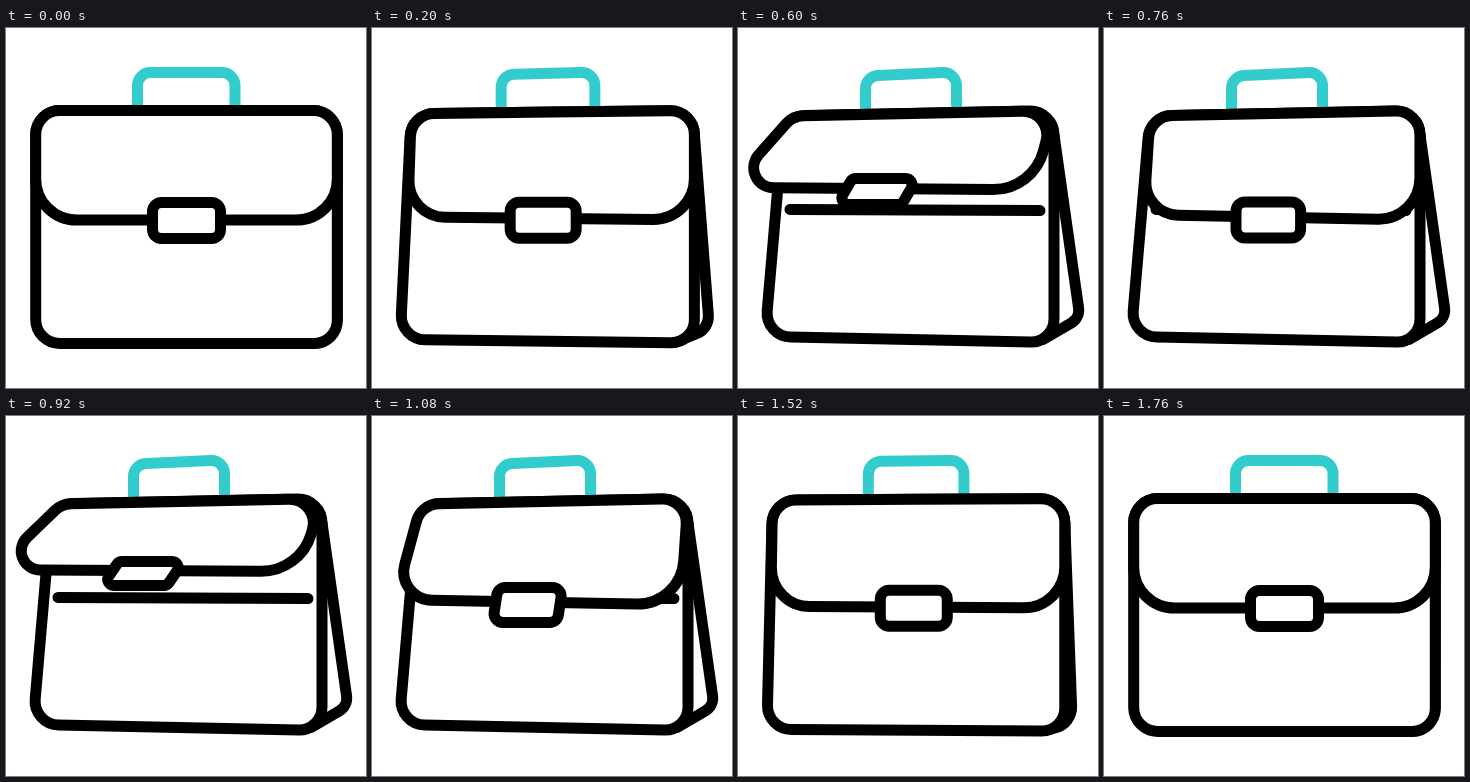
Recreate the animation shown at these times as an HTML page with a canvas. Size 360x360 px, loop 2200 ms.

```html
<!DOCTYPE html>
<html lang="en">
<head>
<meta charset="utf-8">
<title>Briefcase</title>
<style>
html, body { margin: 0; width: 100%; height: 100%; overflow: hidden; background: #fff; }
canvas { display: block; width: 360px; height: 360px; }
</style>
</head>
<body>
<canvas id="stage"></canvas>
<script>
const LOOP = 2200, STEP = 40;
const INK = '#000', TEAL = '#33cccc';
const MAX_LIFT = 51 * Math.PI / 180;

const canvas = document.getElementById('stage');
const ctx = canvas.getContext('2d');
const dpr = window.devicePixelRatio || 1;
canvas.width = canvas.height = 360 * dpr;
ctx.scale(dpr, dpr);

const mix = (a, b, u) => a + (b - a) * u;
const ramp = (t, from, to) => {
  const u = Math.min(1, Math.max(0, (t - from) / (to - from)));
  return u * u * (3 - 2 * u);
};

// 0 faces the viewer, 1 is turned to show the side.
const turnAt = t => ramp(t, 0, 360) - ramp(t, 1235, 1680);

// The flap swings open twice, 400 ms each.
const liftAt = t => t < 350 || t > 1150 ? 0 : MAX_LIFT * Math.sin(Math.PI * (t - 350) / 400) ** 2;

// Points are [x, y, corner radius].
function trace(pts, closed) {
  const n = pts.length, [a, b] = pts;
  ctx.beginPath();
  if (closed) ctx.moveTo((a[0] + b[0]) / 2, (a[1] + b[1]) / 2);
  else ctx.moveTo(a[0], a[1]);
  for (let i = 1; i <= (closed ? n : n - 2); i++) {
    const [x, y, r] = pts[i % n], next = pts[(i + 1) % n];
    ctx.arcTo(x, y, next[0], next[1], r);
  }
  if (closed) ctx.closePath();
  else ctx.lineTo(pts[n - 1][0], pts[n - 1][1]);
}

function line(pts, color = INK) {
  trace(pts, false);
  ctx.strokeStyle = color;
  ctx.stroke();
}

function panel(pts) {
  trace(pts, true);
  ctx.fillStyle = '#fff';
  ctx.fill();
  ctx.strokeStyle = INK;
  ctx.stroke();
}

function draw(t) {
  const turn = turnAt(t), lift = liftAt(t);
  const by = (a, b) => mix(a, b, turn);
  const out = Math.sin(lift), drop = Math.cos(lift);

  const left = by(29.7, 46), right = by(331.3, 316);
  const topL = by(82.5, 88), topR = 82.5;
  const baseL = by(315.5, 308.5), baseR = by(315.5, 314.5);

  ctx.clearRect(0, 0, 360, 360);
  ctx.lineWidth = 11;
  ctx.lineCap = ctx.lineJoin = 'round';

  // handle
  const gripL = by(131.5, 127.5), gripR = by(229, 218.5);
  line([[gripL, 84], [gripL, by(44.5, 48), 13], [gripR, by(44.5, 44), 13], [gripR, 84]], TEAL);

  // side
  line([[right, 107], [by(331, 342), by(315.5, 290), by(24, 15)], [by(307, 305), by(315.5, 311.5)]]);

  // body
  panel([[left, topL, 24], [right, topR, 24], [right, baseR, 23], [by(29.7, 27), baseL, 24]]);

  // pocket edge behind the flap
  line([[by(62, 52), 181.5], [by(290, 302), 182.5]]);

  // flap, hinged on the top edge
  const hemL = topL + by(109.5, 98.5) * drop, hemR = topR + 109.5 * drop;
  panel([
    [left + 13 * out, topL, 24],
    [right, topR, 24],
    [right - 30 * out, hemR, 41 + 22 * out * drop],
    [by(29.7, 40) - 70 * out, hemL, by(41, 33) - 19 * out]
  ]);

  // clasp, riding on the hem
  const cx = by(180.5, 164.5) - 37 * out, cy = mix(hemL, hemR, 0.45) + by(0.5, 3);
  const w = by(34, 32.3), h = 18 * drop, skew = 11 * out;
  panel([[-1, -1], [1, -1], [1, 1], [-1, 1]].map(([sx, sy]) =>
    [cx + sx * w - sy * skew, cy + sy * h, 9 * drop]));
}

const start = performance.now();
function tick() {
  const t = (performance.now() - start) % LOOP;
  draw(Math.floor(t / STEP) * STEP);
  requestAnimationFrame(tick);
}
tick();
</script>
</body>
</html>
```
